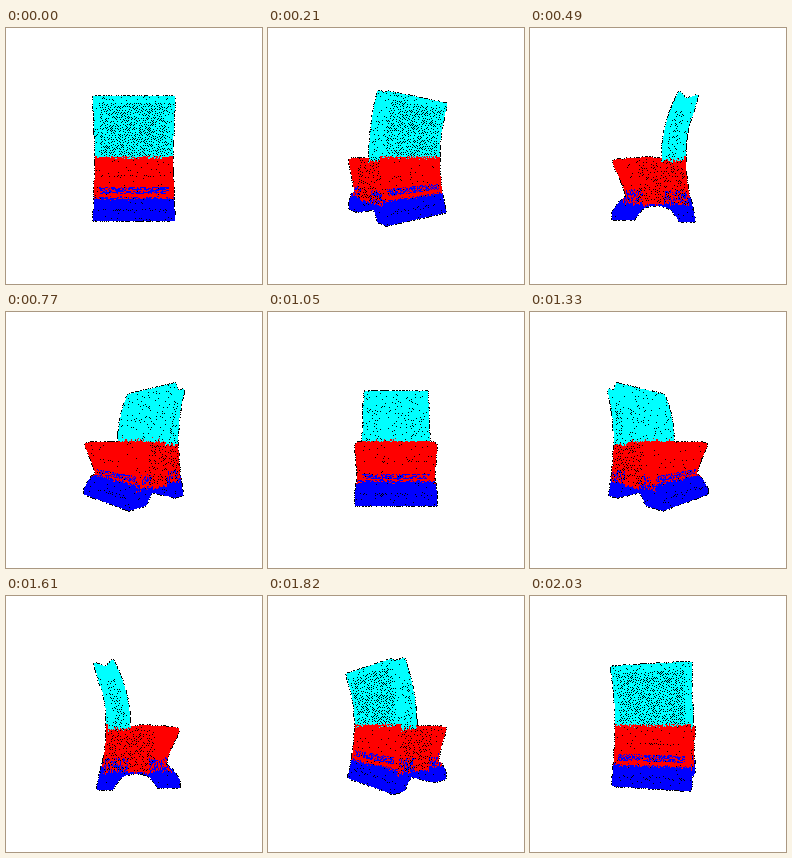
Write a matplotlib script that moves like this. It is 256 by 256 pixels and loops after 2100 ms.

```python
import numpy as np
import matplotlib.pyplot as plt
from matplotlib.animation import FuncAnimation
from matplotlib.path import Path

SIZE, FRAMES, STEP_MS = 256, 30, 70
FOCAL = 220          # camera distance, in stage pixels
HALF = 34.2          # half the width of the chair
SCALE = 0.985
GRID = 0.6           # spacing of the point cloud
TOP, FOOT = 50.4, -54.8

WHITE, BLACK, CYAN, RED, BLUE = range(5)
PALETTE = np.array([[255, 255, 255], [0, 0, 0], [0, 255, 255],
                    [255, 0, 0], [0, 0, 255]], dtype=np.uint8)

rng = np.random.default_rng(4)


# Side view: s is depth (positive to the rear), h is height.
def seat_top(s):
    return -2.8 - 0.004 * (s + 16) ** 2


def back_front(h):
    return 7.8 + 14.3 * (h / 54) ** 2


def rear_edge(h):
    return 26.2 + np.where(h > 0, 10.2 * (h / TOP) ** 2, 8.2 * (h / FOOT) ** 2)


def arch(s):
    return -42 + (FOOT + 42) * np.abs((s - 2) / 20) ** 3


def front_edge(h):
    rise = np.clip((h + 37) / 32, 0, 1) ** 1.3
    flare = np.clip((-37 - h) / 13, 0, 1) ** 0.55
    return -23 - 13 * (rise + flare)


def make_profile():
    s_seat = np.linspace(-35.5, 6, 30)
    h_back = np.linspace(-2, 54, 40)
    h_rear = np.linspace(TOP, FOOT, 60)
    s_arch = np.linspace(22, -18, 40)
    h_front = np.linspace(FOOT, -6, 40)
    return np.vstack([
        np.c_[s_seat, seat_top(s_seat)],
        np.c_[back_front(h_back), h_back],
        [[27, 47.4]],                       # notch between the two tips
        np.c_[rear_edge(h_rear), h_rear],
        np.c_[s_arch, arch(s_arch)],
        np.c_[front_edge(h_front), h_front]])


PROFILE = make_profile()


def blur(level, spread, n):
    """A boundary height with per-point scatter."""
    return level + rng.normal(0, spread, n)


def make_walls():
    """Sweep the profile across the width of the chair."""
    loop = np.vstack([PROFILE, PROFILE[:1]])
    dist = np.r_[0, np.cumsum(np.hypot(*np.diff(loop, axis=0).T))]
    t = np.arange(0, dist[-1], GRID)
    u = np.linspace(-HALF, HALF, int(2 * HALF / GRID))
    t, u = (a.ravel() for a in np.meshgrid(t, u))
    s, h = np.interp(t, dist, loop[:, 0]), np.interp(t, dist, loop[:, 1])
    rear = np.abs(s - rear_edge(h)) < 0.3
    inner = np.abs(u) < 0.88 * HALF
    n = len(t)

    color = np.full(n, RED)
    color[(h > blur(-1.5, 1.3, n)) & (s > 5)] = CYAN
    color[h < blur(-37.5, 0.9, n)] = BLUE
    low = np.where(rear, -34, -35.5)
    strip = inner & (h > low) & (h < low + 6)
    color[strip & (rng.random(n) < 0.55)] = BLUE

    speck = np.where(color == CYAN, 0.05, 0.015)
    speck[inner & rear & (h > 0) & (h < 46)] = 0.5
    speck[inner & (np.abs(h + 47.5) < 1.2)] = 0.2
    speck[inner & (np.abs(h + 18.5) < 0.5)] = 0.2
    return u, s, h, color, speck


def make_cap(u):
    """Fill the flat side of the chair at width u."""
    s, h = (a.ravel() for a in np.meshgrid(np.arange(-38, 38, GRID),
                                           np.arange(-56, 56, GRID)))
    inside = Path(PROFILE).contains_points(np.c_[s, h])
    s, h = s[inside], h[inside]
    n = len(s)

    color = np.full(n, RED)
    color[(h > blur(-4, 1, n)) & (s > 5)] = CYAN
    leg = np.abs(s) > 9
    color[leg & (h < -29) & (rng.random(n) < 0.35)] = BLUE
    color[leg & (h < blur(-41, 1, n))] = BLUE

    middle = (back_front(h) + rear_edge(h)) / 2
    core = np.where(h > 0, (np.abs(s - middle) < 5) & (h < 38),
                    (s > -14) & (h > -40))
    speck = np.where(core, 0.15, 0.01)
    return np.full(n, u), s, h, color, speck


U, S, H, COLOR, SPECK = (np.concatenate(parts) for parts in
                         zip(make_walls(), make_cap(-HALF), make_cap(HALF)))


def neighbours(a):
    return [np.roll(a, d, axis) for axis in (0, 1) for d in (-1, 1)]


def render(i):
    a = 2 * np.pi * i / FRAMES
    depth = S * np.cos(a) - U * np.sin(a)
    zoom = SCALE / (1 - depth / FOCAL)
    x = 128 + (S * np.sin(a) + U * np.cos(a)) * zoom
    y = 128 - H * zoom

    # paint far to near, each point as a 2x2 dot
    order = np.argsort(depth)
    px = np.floor(x[order] - 0.5).astype(int)
    py = np.floor(y[order] - 0.5).astype(int)
    rows = (py[:, None] + [0, 0, 1, 1]).ravel()
    cols = (px[:, None] + [0, 1, 0, 1]).ravel()
    img = np.full((SIZE, SIZE), WHITE)
    speck = np.zeros((SIZE, SIZE))
    img[rows, cols] = np.repeat(COLOR[order], 4)
    speck[rows, cols] = np.repeat(SPECK[order], 4)

    # isolated dark specks and a broken outline
    noise = np.random.default_rng(i).random(img.shape)
    lowest = noise < np.min(neighbours(noise), axis=0)
    solid = img != WHITE
    ring = np.any(neighbours(solid), axis=0) & ~solid
    img[lowest & (noise < speck)] = BLACK
    img[ring & (noise < 0.55)] = BLACK
    return PALETTE[img]


fig = plt.figure(figsize=(2.56, 2.56), dpi=100, facecolor="white")
ax = fig.add_axes([0, 0, 1, 1])
ax.axis("off")
picture = ax.imshow(render(0), interpolation="nearest", aspect="auto")


def update(i):
    picture.set_data(render(i))
    return [picture]


anim = FuncAnimation(fig, update, frames=FRAMES, interval=STEP_MS,
                     repeat=True, repeat_delay=0)
plt.show()
```
